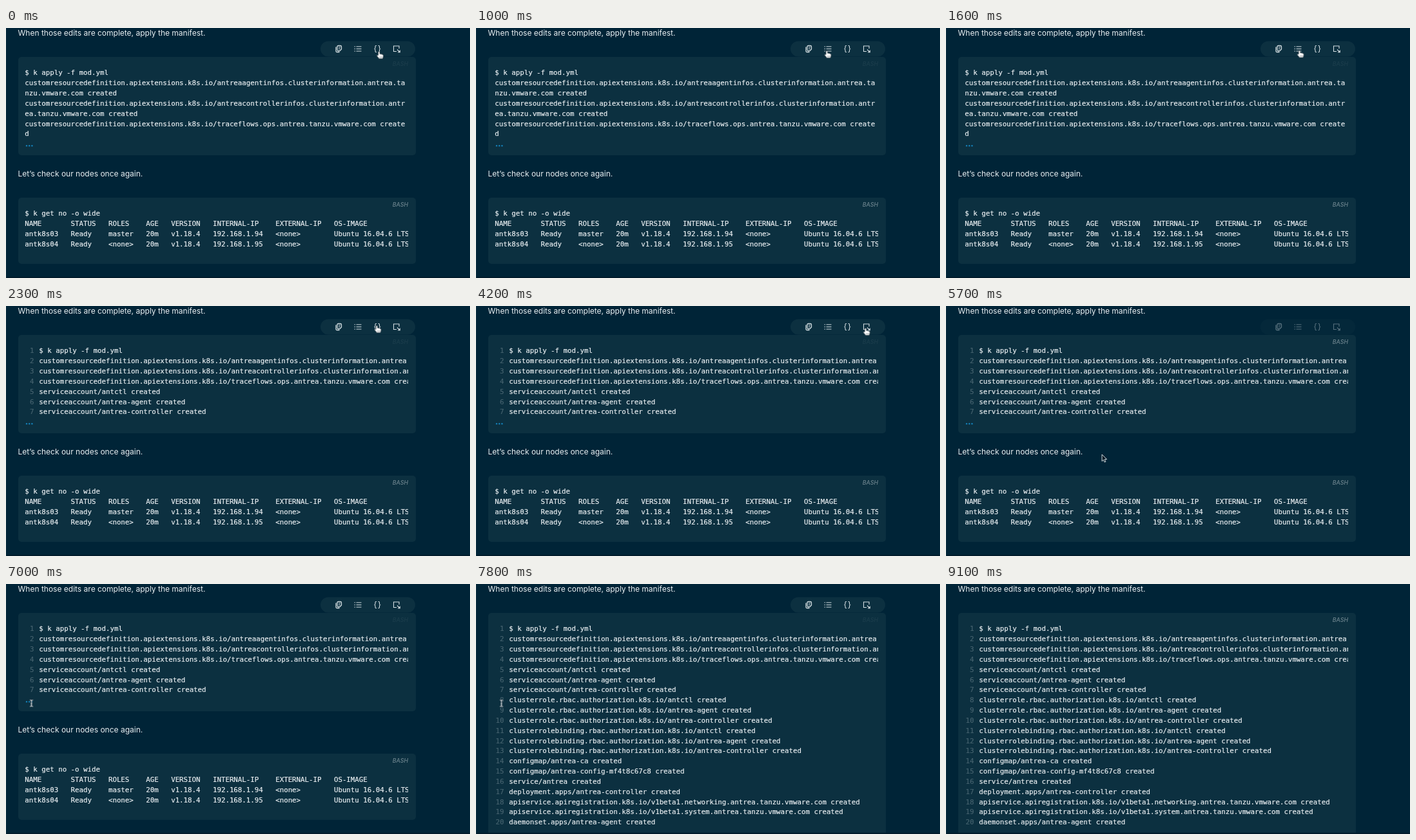
Animation, 720 px wide and 389 px high, one loop 9200 ms. Source, as an HTML page:

```html
<!DOCTYPE html>
<html lang="en">
<head>
<meta charset="utf-8">
<title>Code block toolbar</title>
<style>
html, body { margin: 0; width: 100%; height: 100%; overflow: hidden; background: #002437; }
.stage { position: relative; width: 720px; height: 389px; overflow: hidden; background: #002437; color: #e9eef1; }
.stage::after { content: ""; position: absolute; inset: 0; box-shadow: inset 1px 0 #0a2c3d, inset 0 -2px #011c2c; }
.stage * { position: absolute; margin: 0; }
.stage svg * { position: static; }
p { left: 18.5px; font: 12px/16px Inter, "Open Sans", sans-serif; white-space: nowrap; }
pre {
  font: 10.77px/15.84px "DejaVu Sans Mono", "Liberation Mono", monospace;
  white-space: pre;
  -webkit-text-stroke: .2px;
}
.card { left: 18.5px; width: 617px; background: #0c3040; border-radius: 5px; }
.lang { right: 96px; font: italic 500 8.8px/16px Inter, sans-serif; color: #6b828c; }
.clip { left: 0; width: 623.5px; overflow: hidden; }
.num { right: 580px; text-align: right; color: #45626e; }

/* 9.2 s loop */
.box, .code, .raw, .lined, .below, .bar, .tag, .cursor, .hand, .beam, .arrow {
  animation: 9.2s step-end infinite;
}
.box { top: 44.5px; height: 153.5px; animation-name: box; }
.code { top: 62.3px; height: 111px; animation-name: code; }
.raw { animation-name: raw; }
.lined { animation-name: lined; inset: 0; }
.below { animation-name: below; inset: 0; }
.bar { left: 488px; top: 20px; animation-name: bar; animation-timing-function: linear; }
.tag { top: 48px; animation-name: tag; animation-timing-function: linear; }
.cursor { left: 0; top: 0; animation-name: move; animation-timing-function: ease-in-out; }
.hand { animation-name: hand; }
.beam { animation-name: beam; }
.arrow { animation-name: arrow; }
.cursor svg { left: -12px; top: -12px; }

@keyframes box { 0% { height: 153.5px } 78.26%, 100% { height: 370px } }
@keyframes code { 0% { height: 111px } 78.26%, 100% { height: 322px } }
@keyframes raw { 0% { visibility: visible } 22.83%, 100% { visibility: hidden } }
@keyframes lined { 0% { visibility: hidden } 22.83%, 100% { visibility: visible } }
@keyframes below { 0% { visibility: visible } 78.26%, 100% { visibility: hidden } }
@keyframes bar {
  0%, 58.15% { opacity: 1 }
  64.67%, 70.1% { opacity: 0 }
  73.4%, 88.6% { opacity: 1 }
  93%, 99.9% { opacity: 0 }
  100% { opacity: 1 }
}
@keyframes tag {
  0%, 58.15% { opacity: .15 }
  60.9%, 70.1% { opacity: 1 }
  73.4%, 88.6% { opacity: .15 }
  93%, 99.9% { opacity: 1 }
  100% { opacity: .15 }
}
@keyframes move {
  0%, 4.35% { transform: translate(578.8px, 36.5px) }
  9.78%, 16.3% { transform: translate(544.3px, 35.3px) }
  20.65%, 38.04% { transform: translate(575.3px, 30.3px) }
  43.48%, 53.26% { transform: translate(604.5px, 34.3px) }
  60.87%, 65.76% { transform: translate(242px, 231px) }
  72.83%, 84.78% { transform: translate(39.5px, 185.5px) }
  90.76%, 100% { transform: translate(-20px, 200px) }
}
@keyframes hand { 0% { visibility: visible } 54.6%, 100% { visibility: hidden } }
@keyframes beam {
  0% { visibility: hidden } 54.6% { visibility: visible }
  58.15% { visibility: hidden } 70.1%, 100% { visibility: visible }
}
@keyframes arrow {
  0% { visibility: hidden } 58.15% { visibility: visible } 70.1%, 100% { visibility: hidden }
}
</style>
</head>
<body>
<div class="stage">
  <p style="top:0">When those edits are complete, apply the manifest.</p>

  <div class="below">
    <p style="top:219px">Let’s check our nodes once again.</p>
    <div class="card" style="top:263.5px;height:103.5px"></div>
    <div class="lang" style="top:267px">BASH</div>
    <div class="clip" style="top:281px;height:70px">
<pre style="left:29.3px">$ k get no -o wide
NAME       STATUS   ROLES    AGE   VERSION   INTERNAL-IP    EXTERNAL-IP   OS-IMAGE
antk8s03   Ready    master   20m   v1.18.4   192.168.1.94   &lt;none&gt;        Ubuntu 16.04.6 LTS
antk8s04   Ready    &lt;none&gt;   20m   v1.18.4   192.168.1.95   &lt;none&gt;        Ubuntu 16.04.6 LTS</pre>
    </div>
  </div>

  <div class="card box"></div>
  <div class="lang tag">BASH</div>
  <div class="clip code">
<pre class="raw" style="left:29.3px">$ k apply -f mod.yml
customresourcedefinition.apiextensions.k8s.io/antreaagentinfos.clusterinformation.antrea.ta
nzu.vmware.com created
customresourcedefinition.apiextensions.k8s.io/antreacontrollerinfos.clusterinformation.antr
ea.tanzu.vmware.com created
customresourcedefinition.apiextensions.k8s.io/traceflows.ops.antrea.tanzu.vmware.com create
d</pre>
    <div class="lined">
<pre class="num"></pre>
<pre style="left:51.3px">$ k apply -f mod.yml
customresourcedefinition.apiextensions.k8s.io/antreaagentinfos.clusterinformation.antrea.tanzu.vmware.com created
customresourcedefinition.apiextensions.k8s.io/antreacontrollerinfos.clusterinformation.antrea.tanzu.vmware.com created
customresourcedefinition.apiextensions.k8s.io/traceflows.ops.antrea.tanzu.vmware.com created
serviceaccount/antctl created
serviceaccount/antrea-agent created
serviceaccount/antrea-controller created
clusterrole.rbac.authorization.k8s.io/antctl created
clusterrole.rbac.authorization.k8s.io/antrea-agent created
clusterrole.rbac.authorization.k8s.io/antrea-controller created
clusterrolebinding.rbac.authorization.k8s.io/antctl created
clusterrolebinding.rbac.authorization.k8s.io/antrea-agent created
clusterrolebinding.rbac.authorization.k8s.io/antrea-controller created
configmap/antrea-ca created
configmap/antrea-config-mf4t8c67c8 created
service/antrea created
deployment.apps/antrea-controller created
apiservice.apiregistration.k8s.io/v1beta1.networking.antrea.tanzu.vmware.com created
apiservice.apiregistration.k8s.io/v1beta1.system.antrea.tanzu.vmware.com created
daemonset.apps/antrea-agent created</pre>
    </div>
  </div>

  <svg class="below" width="720" height="389" fill="#1480b8">
    <circle cx="32" cy="183.3" r="1.2"/><circle cx="36.2" cy="183.3" r="1.2"/><circle cx="40.4" cy="183.3" r="1.2"/>
  </svg>

  <svg class="bar" width="148" height="25" fill="none" stroke="#d3dde1" stroke-width="1.1">
    <rect y=".5" width="147" height="24" rx="12" fill="#0c3040" stroke="none"/>
    <path d="M27.5 7.500H31Q32.500 7.500 32.500 9V13L30 15.500H27.500Q26 15.500 26 14V9Q26 7.500 27.500 7.500ZM24 9.500V16Q24 17.500 25.500 17.500H29.500" stroke-width="1.300"/>
    <path d="M28 10H31M28 12.500H30.500"/>
    <path d="M55.500 9H63.500M55.500 12.500H63.500M55.500 16H63.500M52.500 9H54M52.500 12.500H54M52.500 16H54"/>
    <path d="M87 7.500H86Q85 7.500 85 9V11Q85 12.500 83.300 12.500Q85 12.500 85 14V16Q85 17.500 86 17.500H87M89.500 7.500H90.500Q91.500 7.500 91.500 9V11Q91.500 12.500 93.200 12.500Q91.500 12.500 91.500 14V16Q91.500 17.500 90.500 17.500H89.500"/>
    <path d="M122 12V8H113.500V16.500H118M119 13.500L123 17.500M123.300 14.500V17.800H120"/>
  </svg>

  <div class="cursor">
    <svg class="hand" width="28" height="28" viewBox="-12 -12 28 28">
      <path d="M-1.300 .8Q0-.8 1.300 .8V4Q2.400 3.200 3.200 4.300Q4.600 3.700 5.200 4.900Q6.900 4.700 6.900 6.300Q6.900 8.700 5.700 11.300H-.2Q-1.300 8.900-3.500 7Q-3.700 5-1.300 6Z"
        fill="#fff" stroke="#061620" stroke-width=".6"/>
      <path d="M1.200 8V9.700M3 8V9.700M4.700 8V9.700" stroke="#061620" stroke-width=".5"/>
    </svg>
    <svg class="beam" width="28" height="28" viewBox="-12 -12 28 28" fill="none">
      <path id="ibeam" d="M-2.500-5Q0-5 0-3.500Q0-5 2.500-5M0-4V4M-2.500 5Q0 5 0 3.500Q0 5 2.500 5M-1.300 1H1.300"/>
      <use href="#ibeam" stroke="#0a2230" stroke-width="3"/>
      <use href="#ibeam" stroke="#dfe6e9" stroke-width="1.2"/>
    </svg>
    <svg class="arrow" width="28" height="28" viewBox="-12 -12 28 28">
      <path d="M0 0V10.500L2.400 8.300L4 12L5.800 11.200L4.200 7.600H7.500Z" fill="#071a26" stroke="#e6ecee" stroke-width=".9"/>
    </svg>
  </div>
</div>
<script>
document.querySelector('.num').textContent = Array.from({ length: 20 }, (_, i) => i + 1).join('\n');
</script>
</body>
</html>
```
